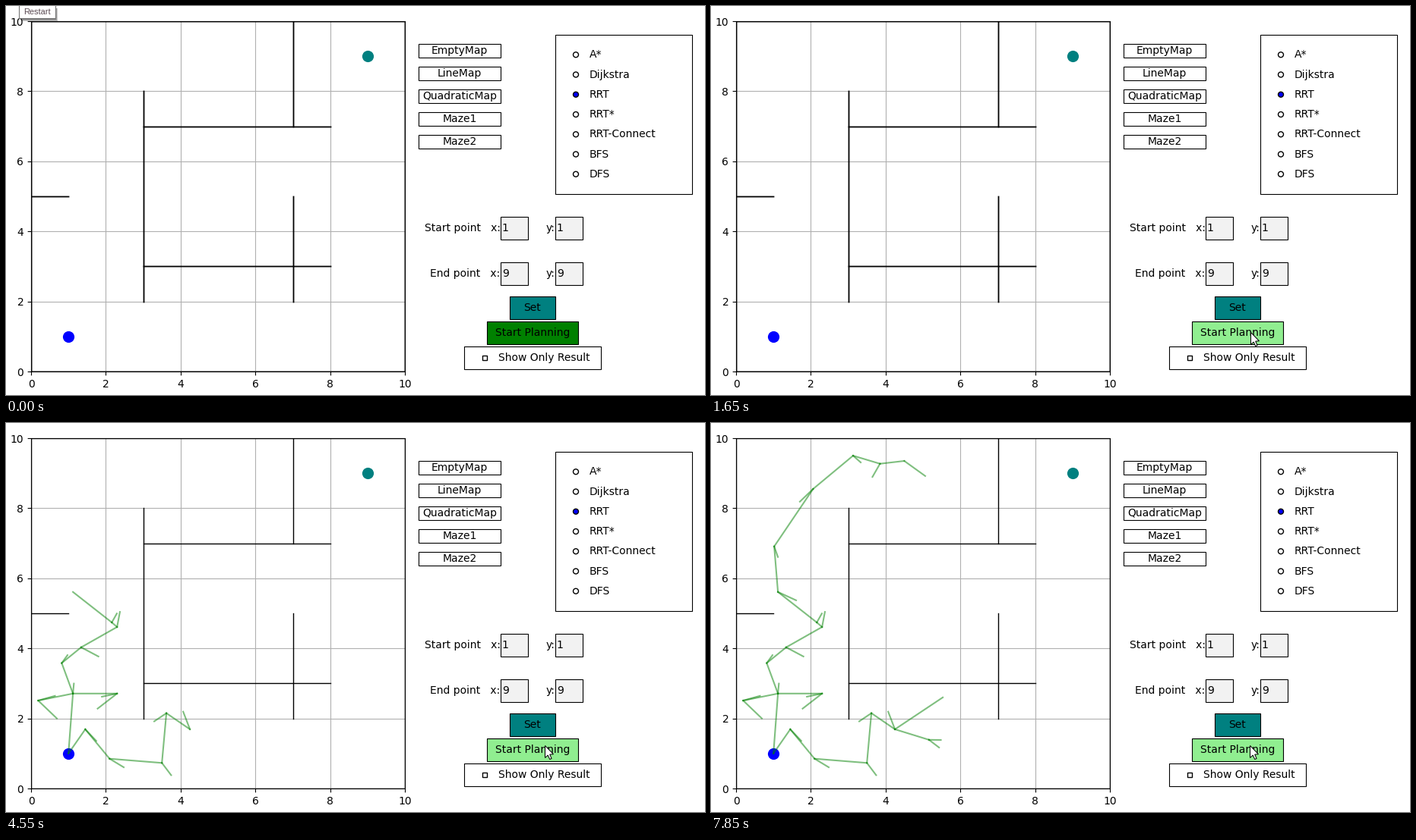
Write a matplotlib script that moves like this. It is 920 px wide and 513 px high and loops after 8000 ms.

```python
import math
import random

import matplotlib.pyplot as plt
import numpy as np
from matplotlib.animation import FuncAnimation
from matplotlib.collections import LineCollection
from matplotlib.patches import Circle, Polygon, Rectangle

W, H, DPI = 920, 513, 64
STEP, LOOP = 50, 8000
PX = 72 / DPI               # points per pixel
FONT = 1000 / 72            # 10 pt at 100 dpi, in pixels
THIN, MEDIUM = 1.11, 1.39   # line widths in pixels
REDRAW = 1800               # planning starts

plt.rcParams["font.family"] = "DejaVu Sans"
fig = plt.figure(figsize=(W / DPI, H / DPI), dpi=DPI, facecolor="white")
ax = fig.add_axes([0, 0, 1, 1])
ax.set(xlim=(0, W), ylim=(H, 0))
ax.axis("off")


def stage(x, y):
    """Map coordinates to stage pixels."""
    return 33 + 49.2 * x, 482 - 46.2 * y


def crisp(x, y):
    """Map coordinates to the centre of a stage pixel."""
    return math.floor(33.4 + 49.25 * x) + 0.5, math.floor(482.5 - 46.2 * y) + 0.5


def label(x, y, s, ha="center", va="center", size=FONT, **kw):
    return ax.text(x, y, s, ha=ha, va=va, fontsize=size * PX, **kw)


def box(x, y, w, h, face="white", edge="black", z=2):
    return ax.add_patch(Rectangle((x + 0.5, y + 0.5), w, h, fc=face, ec=edge,
                                  lw=THIN * PX, snap=False, zorder=z))


def button(x, y, w, h, text, face="white"):
    label(x + w / 2, y + h / 2, text)
    return box(x, y, w, h, face)


def lines(segments, width, color, z, **kw):
    return ax.add_collection(LineCollection(segments, linewidths=width * PX, colors=color,
                                            zorder=z, snap=False, **kw), autolim=False)


# Map: grid, ticks, frame, walls and end points
left, bottom = crisp(0, 0)
right, top = crisp(10, 10)
grid, ticks = [], []
for v in range(0, 11, 2):
    x, y = crisp(v, v)
    grid += [[(x, top), (x, bottom)], [(left, y), (right, y)]]
    ticks += [[(x, bottom), (x, bottom + 4.86)], [(left, y), (left - 4.86, y)]]
    x, y = stage(v, v)
    label(x, 482 + 9.72, str(v), va="top")
    label(33 - 9.72, y, str(v), ha="right", va="center_baseline")
lines(grid, THIN, "#b0b0b0", 1)
lines(ticks, THIN, "black", 2)
box(33, 20, 492, 462, "none", z=3)

WALLS = [((3, 2), (3, 8)), ((3, 7), (8, 7)), ((7, 7), (7, 10)), ((0, 5), (1, 5)),
         ((3, 3), (8, 3)), ((7, 2), (7, 5))]
CORNERS = [(0, 0), (10, 0), (10, 10), (0, 10), (0, 0)]
WALLS += zip(CORNERS, CORNERS[1:])
walls = lines([[crisp(*a), crisp(*b)] for a, b in WALLS], MEDIUM, "black", 3,
              capstyle="projecting")
walls.set_clip_path(Rectangle((33, 20), 493, 463, transform=ax.transData))
for point, color in (((1, 1), "blue"), ((9, 9), "teal")):
    ax.add_patch(Circle(crisp(*point), 7.6, fc=color, ec="none", zorder=4))

# Control panel
for i, name in enumerate(("EmptyMap", "LineMap", "QuadraticMap", "Maze1", "Maze2")):
    button(543, 50 + 30 * i, 108, 18, name)

box(723, 38, 180, 210)
for i, name in enumerate(("A*", "Dijkstra", "RRT", "RRT*", "RRT-Connect", "BFS", "DFS")):
    y = 38 + 26.25 * (i + 1)
    ax.add_patch(Circle((750, y), 3.47, fc="blue" if name == "RRT" else "white",
                        ec="black", lw=MEDIUM * PX, zorder=3))
    label(768, y, name, ha="left")

fields = {}
for y, name, value in ((278, "Start point", "1"), (338, "End point", "9")):
    for x, text in ((651, name + "   x:"), (723, "y:")):
        fields[x, y] = box(x, y, 36, 30, "0.95")
        label(x - 0.36, y + 15, text, ha="right")
        label(x + 1.8, y + 15, value, ha="left")

button(663, 383, 60, 30, "Set", "teal")
start = button(633, 416, 120, 30, "Start Planning", "green")
box(603, 449, 180, 30)
box(627, 461, 6, 6, z=3).set_linewidth(MEDIUM * PX)
label(648, 464, "Show Only Result", ha="left")

# Tooltip with a soft shadow
tooltip = [ax.add_patch(Rectangle((20 + i, 3), 48 - 2 * i, 17 - i, fc="black", ec="none",
                                  alpha=0.2, zorder=6)) for i in range(3)]
tooltip += [box(17, -3, 48, 19, "white", "#767676", 7),
            label(41, 11, "Restart", va="baseline", size=11, color="#5b4b53",
                  family="Liberation Sans", zorder=8)]

# Search tree: a few main branches, then random twigs from their joints
edges, joints = [], []


def add_edge(a, b, birth):
    edges.append((birth, [stage(*a), stage(*b)]))


def grow(begin, end, ease, *points):
    """Add a branch whose joints appear one by one from begin to end."""
    spans = list(zip(points, points[1:]))
    for i, (a, b) in enumerate(spans):
        birth = begin + (end - begin) * (i / max(1, len(spans) - 1)) ** ease
        add_edge(a, b, birth)
        if i < len(spans) - 1:
            joints.append((birth, b))


root, west, south = (1, 1), (1.12, 2.71), (4.25, 1.69)
grow(REDRAW, 7550, 1.15, root, west, (0.82, 3.58), (1.34, 4.03), (2.3, 4.61), (2.16, 4.74),
     (1.12, 5.61), (1.02, 6.91), (2.06, 8.55), (3.13, 9.5), (3.85, 9.27), (4.5, 9.35),
     (5.06, 8.92))
grow(1950, 5000, 2, root, (1.45, 1.69), (2.1, 0.85), (3.5, 0.73), (3.62, 2.15), south,
     (5.53, 2.6))
grow(2600, 3450, 1, west, (0.19, 2.51), (0.69, 2))
grow(2800, 3900, 1, west, (2.3, 2.71), (1.78, 2.28))
grow(6700, 7400, 1, south, (5.16, 1.39), (5.43, 1.17))

rng = random.Random(4)
for birth, (x, y) in joints:
    angle, length = rng.uniform(0, math.tau), rng.uniform(0.25, 0.6)
    tip = np.clip((x + length * math.cos(angle), y + length * math.sin(angle)), 0.2, 9.8)
    add_edge((x, y), tip, birth + rng.uniform(400, 1500))
tree = lines([], 2.08, "green", 5, alpha=0.5, capstyle="projecting")

# Mouse pointer
ARROW = np.array([(0, 0), (0, 16), (3.7, 12.6), (6.2, 18), (8.6, 17), (6.2, 11.6), (11, 11.3)])
cursor = ax.add_patch(Polygon(ARROW, closed=True, fc="white", ec="black", lw=PX,
                              snap=False, zorder=9))
KEYS = np.array([(150, 250, 60), (400, 736, 300), (500, 730, 412), (1050, 711, 431),
                 (3500, 711, 431), (3600, 710, 426)])


def update(frame):
    t = frame * STEP
    for part in tooltip:
        part.set_visible(t < 100)
    cursor.set_visible(t >= 150)
    cursor.set_xy(ARROW - 0.5 + [np.interp(t, KEYS[:, 0], KEYS[:, k]) for k in (1, 2)])
    fields[723, 278].set_facecolor("white" if 400 <= t < 600 else "0.95")
    start.set_facecolor("lightgreen" if t >= 600 else "green")
    walls.set_linewidth((1.8 if t < REDRAW else MEDIUM) * PX)
    tree.set_segments([edge for birth, edge in edges if birth <= t])
    return ()


anim = FuncAnimation(fig, update, frames=LOOP // STEP, interval=STEP, repeat=True,
                     repeat_delay=0, blit=False)
plt.show()
```
